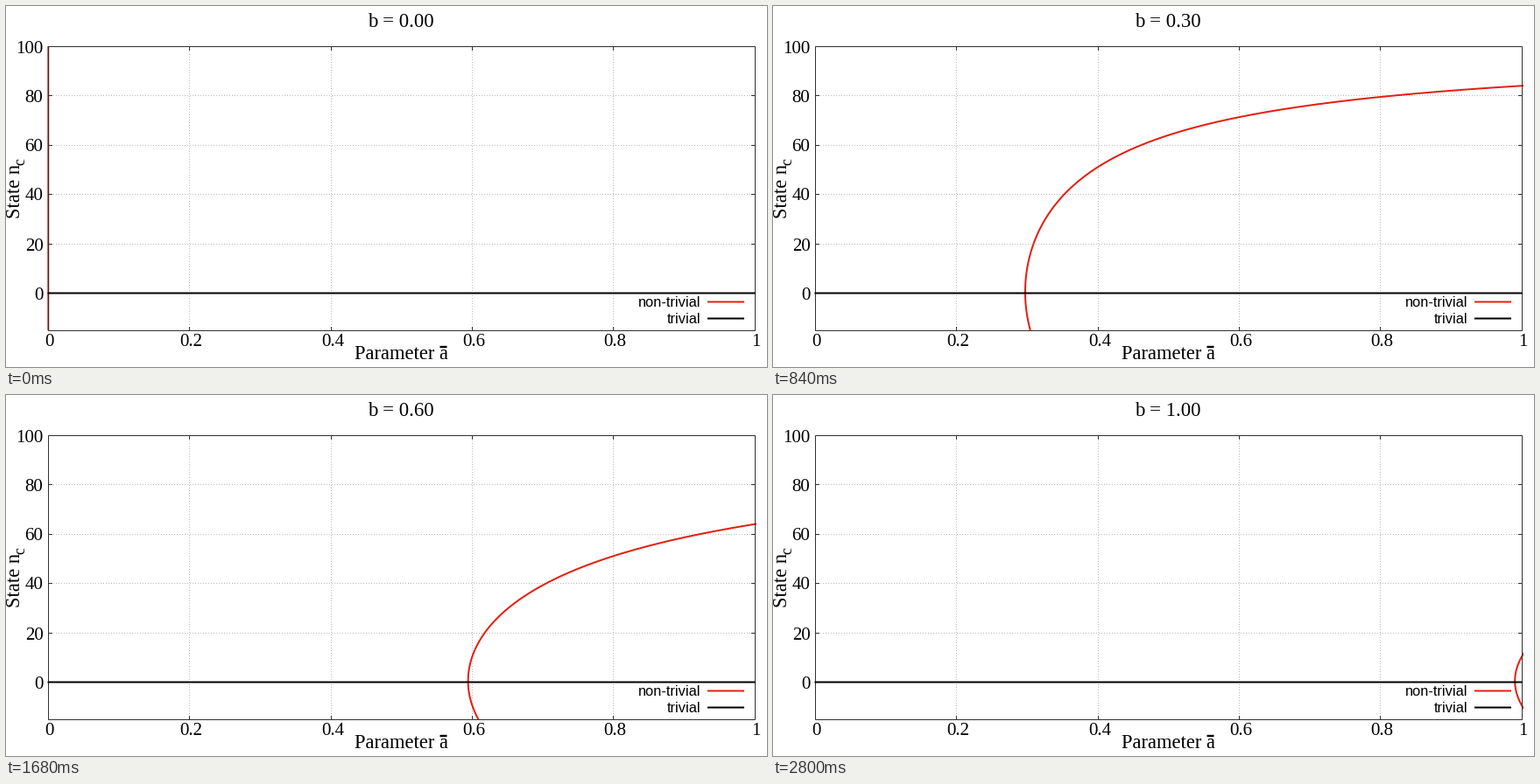
A matplotlib script for the animation above (2870 ms loop, 869 px wide and 413 px high).

```python
import math

import numpy as np
import matplotlib.pyplot as plt
from matplotlib.animation import FuncAnimation
from matplotlib.patches import Rectangle
from matplotlib.transforms import Bbox, TransformedBbox

W, H, DPI = 869, 413, 64
LEFT, RIGHT, TOP, BOTTOM = 48, 855, 46, 371
N_MIN, N_MAX = -15, 100
STEPS = 40
RED, BORDER, GRID = "#e51e10", "#303030", "#bcbcbc"
SERIF, SANS = "Liberation Serif", "Liberation Sans"


def pt(px):
    return px * 72 / DPI


def to_x(a):
    return LEFT + 0.3 + a * (RIGHT - LEFT)


def to_y(n):
    return TOP + (N_MAX - n) * (BOTTOM - TOP) / (N_MAX - N_MIN)


def crisp(v):
    """Centre of the pixel that holds v."""
    return math.floor(v) + 0.5


fig = plt.figure(figsize=(W / DPI, H / DPI), dpi=DPI, facecolor="white")
ax = fig.add_axes([0, 0, 1, 1])
ax.set_xlim(0, W)
ax.set_ylim(H, 0)
ax.axis("off")


def line(xs, ys, color, width=1.0, z=2, **kw):
    return ax.plot(xs, ys, color=color, lw=pt(width), zorder=z, snap=False,
                   solid_capstyle="butt", **kw)[0]


def label(x, y, text, size, ha="left", font=SERIF, **kw):
    return ax.text(x, y, text, fontsize=pt(size), family=font, ha=ha,
                   va="baseline", color="black", zorder=5, **kw)


def ticks_and_grid():
    dots = dict(dashes=(1, 2), dash_capstyle="butt")
    for k in range(6):
        a, n = k / 5, 20 * k
        x, y = crisp(to_x(a)), crisp(to_y(n))
        if 0 < k < 5:
            line([x, x], [TOP, BOTTOM], GRID, z=1, **dots)
            line([x, x], [TOP, TOP + 5], BORDER, z=3)
            line([x, x], [BOTTOM - 4, BOTTOM + 1], BORDER, z=3)
        if k < 5:
            line([LEFT, RIGHT], [y, y], GRID, z=1, **dots)
            line([LEFT, LEFT + 5], [y, y], BORDER, z=3)
            line([RIGHT - 4, RIGHT + 1], [y, y], BORDER, z=3)
        label(x + 1.4, 389, f"{a:g}", 21, "center")
        label(42.5, y + 7, str(n), 21, "right")


def legend_row(y, text, color):
    label(793, y + 6, text, 16.4, "right", SANS)
    line([801, 843], [crisp(y)] * 2, color, 2, z=5)


ticks_and_grid()
ax.add_patch(Rectangle((LEFT + 0.5, TOP + 0.5), RIGHT - LEFT, BOTTOM - TOP,
                       fill=False, ec=BORDER, lw=pt(1), zorder=3, snap=False))
line([LEFT - 0.5, RIGHT + 1], [crisp(to_y(0))] * 2, "black", 2, z=4)
legend_row(338, "non-trivial", RED)
legend_row(357, "trivial", "black")

label(398.4, 404, "Parameter a", 22.5)
line([495.5, 503.5], [390, 390], "black", 2.4, z=5)
vertical = dict(rotation=90, rotation_mode="anchor")
label(16, 243, "State n", 22.5, **vertical)
label(21.6, 182, "c", 18, **vertical)

title = label(413, 23.5, "", 22.7)
curve = line([], [], RED, 2)
curve.set_clip_box(TransformedBbox(
    Bbox([[LEFT - 1, TOP - 0.5], [RIGHT + 1.5, BOTTOM + 1.5]]), ax.transData))

# Non-trivial branch: parameter a as a multiple of b for each state n
state = np.linspace(N_MIN, N_MAX - 0.01, 2500)
share = state / 100
ratio = 0.99 / ((1 - share**2) * (1 + 0.01 * share))


def update(i):
    b = i / STEPS
    title.set_text(f"b = {b:.2f}")
    curve.set_data(to_x(np.minimum(b * ratio, 1.5)), to_y(state))
    return title, curve


anim = FuncAnimation(fig, update, frames=STEPS + 1, interval=70,
                     repeat=True, repeat_delay=0, blit=False)
plt.show()
```
